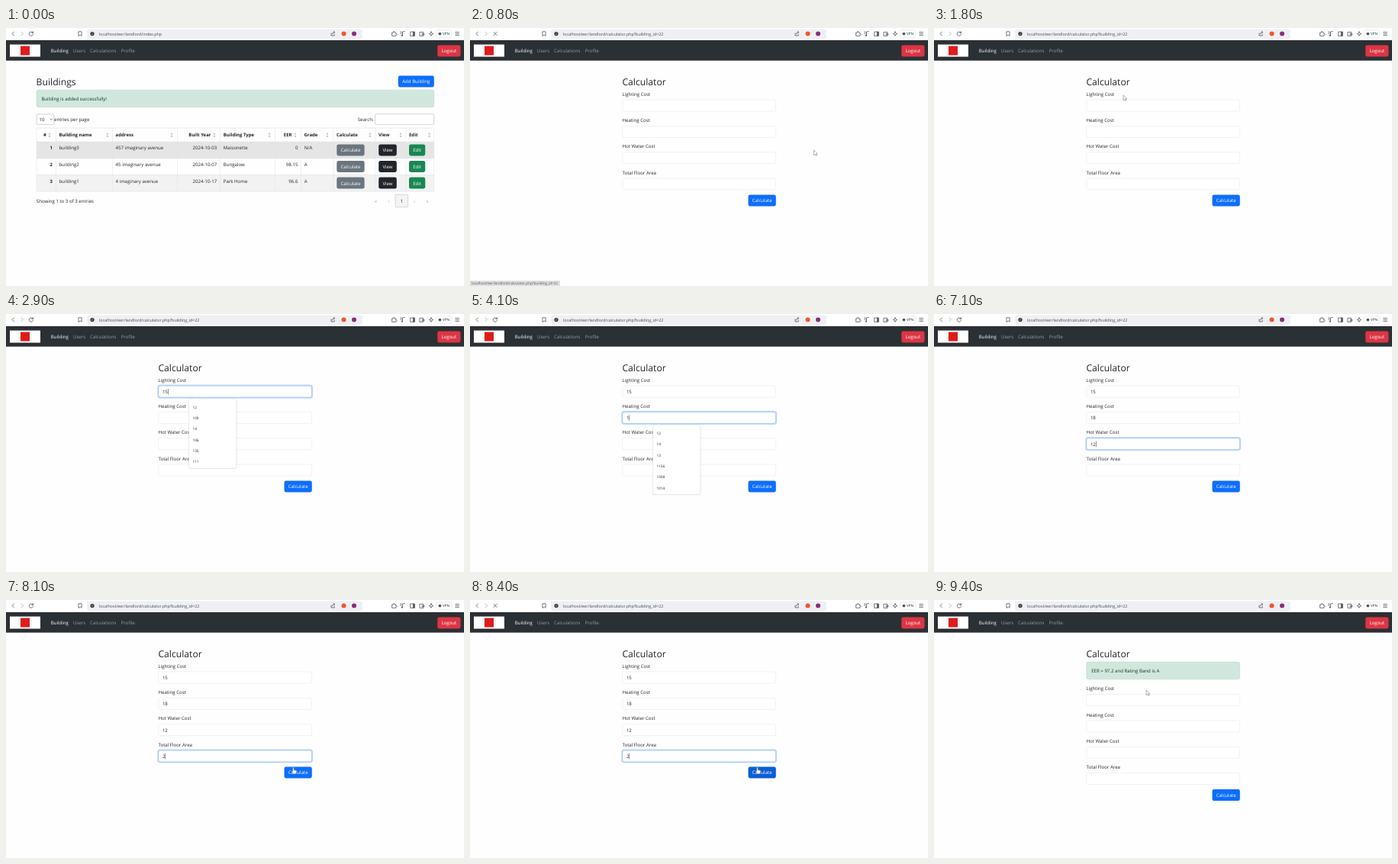
Write an HTML page that moves like this. It is 600 px wide and 338 px high and loops after 9.5 s.

```html
<!DOCTYPE html>
<html lang="en">
<head>
<meta charset="utf-8">
<title>Building calculator</title>
<style>
  html, body { margin: 0; width: 100%; height: 100%; overflow: hidden; background: #fefefe; }
  svg { display: block; width: 100vw; height: 100vh; }
  text { font: 6.1px "Open Sans", "Noto Sans", sans-serif; fill: #212529; text-rendering: geometricPrecision; white-space: pre; }
  .h { font-size: 12.2px; font-weight: 500; }
  .b { font-size: 6px; font-weight: 700; }
  .w { fill: #fff; }
  .on { fill: #fff; font-weight: 500; }
  .nav { fill: #9a9da0; }
  .ok { fill: #0a3622; }
  .url { font-size: 5.35px; fill: #45494e; }
  .tip { font-size: 4.6px; fill: #55595e; }
  .item { font-size: 4.7px; }
  .dim { fill: #999; }
  .r { text-anchor: end; }
  .m { text-anchor: middle; }
  .ico { fill: none; stroke: #55595e; stroke-width: .8; stroke-linecap: round; stroke-linejoin: round; }
</style>
</head>
<body>
<svg id="stage" viewBox="0 0 600 338" xmlns="http://www.w3.org/2000/svg"></svg>
<script>
const LOOP = 9500, STEP = 100;
const BLUE = '#0d6efd', FIELD_GAP = 34.3, SHIFT = 29.6;
const PATH = 'localhost/eer/landlord/';
const CALC_URL = PATH + 'calculator.php?building_id=22';

const fields = [
  { label: 'Lighting Cost', focus: 1900, blur: 3700, keys: [[2500, '1'], [2800, '15']],
    drop: [2700, 3200], items: [12, 109, 14, 106, 135, 111] },
  { label: 'Heating Cost', focus: 3700, blur: 5000, keys: [[4000, '1'], [4600, '18']],
    drop: [4000, 4700], items: [12, 14, 13, 1156, 1008, 1014] },
  { label: 'Hot Water Cost', focus: 5000, blur: 7300, keys: [[5100, '1'], [6400, '12']],
    drop: [5200, 6600], items: [190, 12, 13, 158, 14, 15] },
  { label: 'Total Floor Area', focus: 7300, blur: 8500, keys: [[7400, '2']],
    drop: [7400, 7700], items: [20, 25, 24, 200, 23, 250] }
];

// time, x, y of the pointer
const route = [
  [100, 476, 164], [300, 452, 160], [800, 450.5, 160], [1000, 440, 152], [1500, 300, 76],
  [1800, 248, 88], [2000, 244.5, 103], [7600, 244.5, 103], [8000, 376.3, 219.3],
  [8500, 376.3, 219.3], [8800, 300, 150], [9000, 213, 90], [9200, 250, 106], [9400, 278, 118]
];

const text = (x, y, s, cls = '') => `<text x="${x}" y="${y}" class="${cls}">${s}</text>`;
const rect = (x, y, w, h, fill, extra = '') =>
  `<rect x="${x}" y="${y}" width="${w}" height="${h}" fill="${fill}" ${extra}/>`;
const line = (x1, y1, x2, y2, color) =>
  `<line x1="${x1}" y1="${y1}" x2="${x2}" y2="${y2}" stroke="${color}" stroke-width=".5"/>`;
const icon = (d, extra = '') => `<path class="ico" d="${d}" ${extra}/>`;
const dot = (x, y, r, fill) => `<circle cx="${x}" cy="${y}" r="${r}" fill="${fill}"/>`;
const button = (x, y, w, s, fill, id = '') =>
  rect(x, y, w, 15, fill, `rx="2.4" ${id && `id="${id}"`}`) + text(x + w / 2, y + 9.9, s, 'w m');
const alertBox = (x, w, s) =>
  rect(x, 81.2, w, 22.6, '#d1e7dd', 'rx="2.4" stroke="#a3cfbb" stroke-width=".4"') + text(x + 6.4, 95.2, s, 'ok');

function browserBar() {
  return rect(0, 0, 600, 16, '#fff') +
    icon('M10.5 5 8 7.5l2.5 2.5') + icon('M20 5l2.5 2.5L20 10', 'opacity=".45"') +
    icon('M35.2 6.1A2.7 2.7 0 1 0 35.6 8M35.5 4.6V6.4H33.7', 'id="reload"') +
    icon('M31 5.3l4.2 4.2M35.2 5.3l-4.2 4.2', 'id="stop"') +
    icon('M95.3 4.8h3.8v5.6l-1.9-1.5-1.9 1.5z') +
    rect(106, 1.5, 361, 12.4, '#eef0f3', 'rx="3"') +
    dot(113, 7.6, 2.6, '#34383c') + rect(112.7, 7.2, .6, 1.8, '#fff') + rect(112.7, 6, .6, .6, '#fff') +
    '<text id="url" class="url" x="122" y="9.5"></text>' +
    icon('M426 7v3h4.2V8.6M427.3 8c.2-1.8 1.4-2.4 3.2-2.4M429.3 4.2l1.5 1.4-1.5 1.4') +
    dot(442.5, 7.5, 3, '#f1562b') + dot(456, 7.6, 3, '#8a2d78') +
    icon('M506 6h1.4a1 1 0 1 1 1.8 0h1.4v1.6a1 1 0 1 1 0 1.6v1.2H506z') +
    icon('M519.5 9.7V5l3-.6M516.6 5.2h1.8M516.6 7.2h1.8') + dot(518.7, 9.8, 1, '#55595e') +
    icon('M530 5h5.4v5.4H530zM533.4 5v5.4') + rect(533.2, 5, 2.2, 5.4, '#55595e') +
    icon('M542.3 5.4h4.6v5h-4.6zM545.4 7.3h2.4v1.6h-2.4z') +
    icon('M557 4.8l.8 2 2 .8-2 .8-.8 2-.8-2-2-.8 2-.8z') +
    rect(563.5, 2.6, 20.5, 10, '#fff', 'rx="2.2" stroke="#d8dadd" stroke-width=".5"') +
    dot(568.4, 7.6, 1.9, '#55595e') + text(572, 9.4, 'VPN', 'item') +
    icon('M588.8 5.5h4.6M588.8 7.6h4.6M588.8 9.7h4.6');
}

function navBar() {
  return rect(0, 16, 600, 26.7, '#2b3035') +
    rect(5, 21.6, 40, 16, '#fff') + rect(19, 23.6, 12, 12, '#e01b1b') +
    text(58.7, 32.4, 'Building', 'on') + text(88, 32.4, 'Users', 'nav') +
    text(110, 32.4, 'Calculations', 'nav') + text(150.7, 32.4, 'Profile', 'nav') +
    button(565.2, 22.5, 30.3, 'Logout', '#dc3545');
}

function listPage() {
  const edges = [40, 65.5, 139.5, 224.5, 280.5, 352.5, 386.5, 429, 484, 524, 560.7];
  // heading, text x, sort arrow x, extra class
  const heads = [['#', 53, 57, ' r'], ['Building name', 69.4, 133, ''], ['address', 143.6, 217, ''],
    ['Built Year', 268.5, 273, ' r'], ['Building Type', 284.8, 345, ''], ['EER', 374.5, 379, ' r'],
    ['Grade', 390.5, 421, ''], ['Calculate', 433, 477, ''], ['View', 488, 517, ''], ['Edit', 528, 554.5, '']];
  const rows = [['building3', '457 imaginary avenue', '2024-10-03', 'Maisonette', '0', 'N/A'],
    ['building2', '45 imaginary avenue', '2024-10-07', 'Bungalow', '98.15', 'A'],
    ['building1', '4 imaginary avenue', '2024-10-17', 'Park Home', '96.6', 'A']];
  const fills = ['#e5e5e5', '#fefefe', '#f2f2f2'];
  let s = text(39.6, 75, 'Buildings', 'h') + button(513.8, 62.5, 47, 'Add Building', BLUE) +
    alertBox(40, 520.7, 'Building is added successfully!') +
    rect(40.2, 113, 22.6, 13.4, '#fff', 'rx="1.2" stroke="#aaa" stroke-width=".5"') +
    text(43.5, 122.2, '10') + icon('M57.8 119l1.4 1.5 1.4-1.5') + text(63, 122.2, 'entries per page') +
    text(481.5, 122.2, 'Search:', 'r') +
    rect(483.5, 112.6, 77, 13.8, '#fff', 'rx="1.2" stroke="#aaa" stroke-width=".5"');

  rows.forEach((row, i) => {
    const top = 149.2 + i * 21.6, y = top + 10.1;
    s += rect(40, top, 520.7, 21.6, fills[i]) + text(61, y, i + 1, 'b r') +
      text(69.4, y, row[0]) + text(143.6, y, row[1]) + text(276.3, y, row[2], 'r') +
      text(284.8, y, row[3]) + text(382.4, y, row[4], 'r') + text(390.7, y, row[5]) +
      button(433.3, top + 3.2, 36.3, 'Calculate', '#6c757d', i ? '' : 'open') +
      button(488.2, top + 3.2, 23.6, 'View', '#212529') + button(528, top + 3.2, 21.2, 'Edit', '#198754');
  });
  heads.forEach(([name, x, ax, cls]) => {
    s += text(x, 142.4, name, 'b' + cls) +
      `<path fill="#bbb" d="M${ax - 1.4} 139.4h2.8l-1.4-2.4zM${ax - 1.4} 141h2.8l-1.4 2.4z"/>`;
  });
  edges.forEach(x => s += line(x, 131, x, 214, '#dee2e6'));
  [131, 149.2, 170.8, 192.4, 214].forEach(y => s += line(40, y, 560.7, y, '#d5d9dd'));

  s += text(39.8, 228.8, 'Showing 1 to 3 of 3 entries') +
    rect(510, 218.2, 16.6, 16.4, '#f4f4f4', 'rx=".8" stroke="#b5b5b5" stroke-width=".5"');
  ['«', '‹', '1', '›', '»'].forEach((c, i) =>
    s += text(484.6 + i * 16.85, 228.6, c, i === 2 ? 'm' : 'm dim'));
  return s;
}

function calcPage() {
  let s = text(199.4, 75, 'Calculator', 'h') +
    `<g id="result">${alertBox(199.8, 200.8, 'EER = 97.2 and Rating Band is A')}</g><g id="form">`;
  fields.forEach((f, i) => {
    const y = 94.1 + i * FIELD_GAP;
    s += text(199.5, y - 5.4, f.label) +
      rect(199.8, y, 200.8, 15, '#fff', 'rx="2.4" stroke="#dee2e6" stroke-width=".5"') +
      `<g id="ring${i}">` +
      rect(199, y - .8, 202.4, 16.6, 'none', 'rx="3" stroke="#c2dbfe" stroke-width="1.6"') +
      rect(199.8, y, 200.8, 15, 'none', 'rx="2.4" stroke="#86b7fe" stroke-width=".6"') + '</g>' +
      `<text id="val${i}" x="204.9" y="${y + 9.9}"></text>` + rect(205, y + 4, .5, 7.4, '#222', `id="caret${i}"`);
  });
  s += button(364.5, 218.5, 36.3, 'Calculate', BLUE, 'send');
  fields.forEach((f, i) => {
    const y = 94.1 + i * FIELD_GAP;
    s += `<g id="drop${i}">` + rect(239.2, y + 17.3, 63, 91.6, '#000', 'rx="2" opacity=".08"') +
      `<path d="M245.4 ${y + 17}l2-1.6 2 1.6z" fill="#fff" stroke="#ccc" stroke-width=".3"/>` +
      rect(239.6, y + 16.9, 62.2, 91.2, '#fff', 'rx="2" stroke="#d4d6d9" stroke-width=".4"') +
      f.items.map((n, k) => text(244.5, y + 29.5 + k * 14.35, n, 'item')).join('') + '</g>';
  });
  return s + '</g>';
}

const pointer = '<g id="pointer" stroke="#666" stroke-width=".5" stroke-linejoin="round" fill="#fff">' +
  '<path id="arrow" d="M0 0V6.6L1.6 5.2 2.7 7.5 3.8 7 2.8 4.8H4.9Z"/>' +
  '<path id="hand" d="M-.6.5a.7.7 0 0 1 1.4 0V3.3L3.8 4Q4.6 4.3 4.4 5.2L3.7 8.4H.1L-1.8 5.4Q-2 4.4-.6 5Z"/>' +
  '<path id="beam" fill="none" d="M-1.2-3.6H1.2M0-3.6V3.6M-1.2 3.6H1.2"/></g>';

document.getElementById('stage').innerHTML = rect(0, 0, 600, 338, '#fefefe') +
  `<g id="list">${listPage()}</g><g id="calc">${calcPage()}</g>` + browserBar() + navBar() +
  '<g id="status">' + rect(0, 331, 118, 7, '#dcdee1') + text(2, 336.4, CALC_URL, 'tip') + '</g>' + pointer;

const el = {};
document.querySelectorAll('[id]').forEach(n => el[n.id] = n);
const show = (id, v) => el[id].setAttribute('opacity', Number(v));
const within = (t, a, b) => t >= a && t < b;

function position(t) {
  const i = Math.max(0, route.findLastIndex(p => p[0] <= t));
  const a = route[i], b = route[i + 1] || a;
  const k = b === a ? 0 : Math.max(0, (t - a[0]) / (b[0] - a[0]));
  return [a[1] + (b[1] - a[1]) * k, a[2] + (b[2] - a[2]) * k];
}

function renderField(f, i, t, done) {
  const active = within(t, f.focus, f.blur);
  const key = f.keys.findLast(k => k[0] <= t);
  const value = done || !key ? '' : key[1];
  const [on, off] = f.drop;
  show('ring' + i, done ? 0 : active ? (t < f.focus + STEP ? .6 : 1) : within(t, f.blur, f.blur + STEP) ? .4 : 0);
  el['val' + i].textContent = value;
  el['caret' + i].setAttribute('x', 205 + value.length * 3.49);
  show('caret' + i, active && !within(t, 2200, 2400) && !within(t, 5700, 6300));
  show('drop' + i, within(t, on, off) ? 1 : within(t, off, off + STEP) ? .5 : 0);
}

function render(t) {
  const onCalc = t >= 600, done = t >= 8500;
  const loading = within(t, 500, 1000) || within(t, 8300, 8500);
  show('list', !onCalc);
  show('calc', onCalc);
  show('result', done);
  el.form.setAttribute('transform', `translate(0 ${done ? SHIFT : 0})`);
  el.url.textContent = onCalc ? CALC_URL : PATH + 'index.php';
  show('reload', !loading);
  show('stop', loading);
  show('status', within(t, 300, 1200));
  el.open.setAttribute('fill', t >= 300 ? '#5c636a' : '#6c757d');
  el.send.setAttribute('fill', within(t, 8200, 8500) ? '#0b5ed7' : BLUE);
  fields.forEach((f, i) => renderField(f, i, t, done));

  const hand = within(t, 300, 700) || within(t, 7900, 8500), beam = within(t, 1900, 2500);
  show('pointer', within(t, 100, 2500) || t >= 7600);
  show('hand', hand);
  show('beam', beam);
  show('arrow', !hand && !beam);
  el.pointer.setAttribute('transform', `translate(${position(t)})`);
}

const start = performance.now();
function tick() {
  const t = (performance.now() - start) % LOOP;
  render(Math.floor(t / STEP) * STEP);
  requestAnimationFrame(tick);
}
tick();
</script>
</body>
</html>
```
